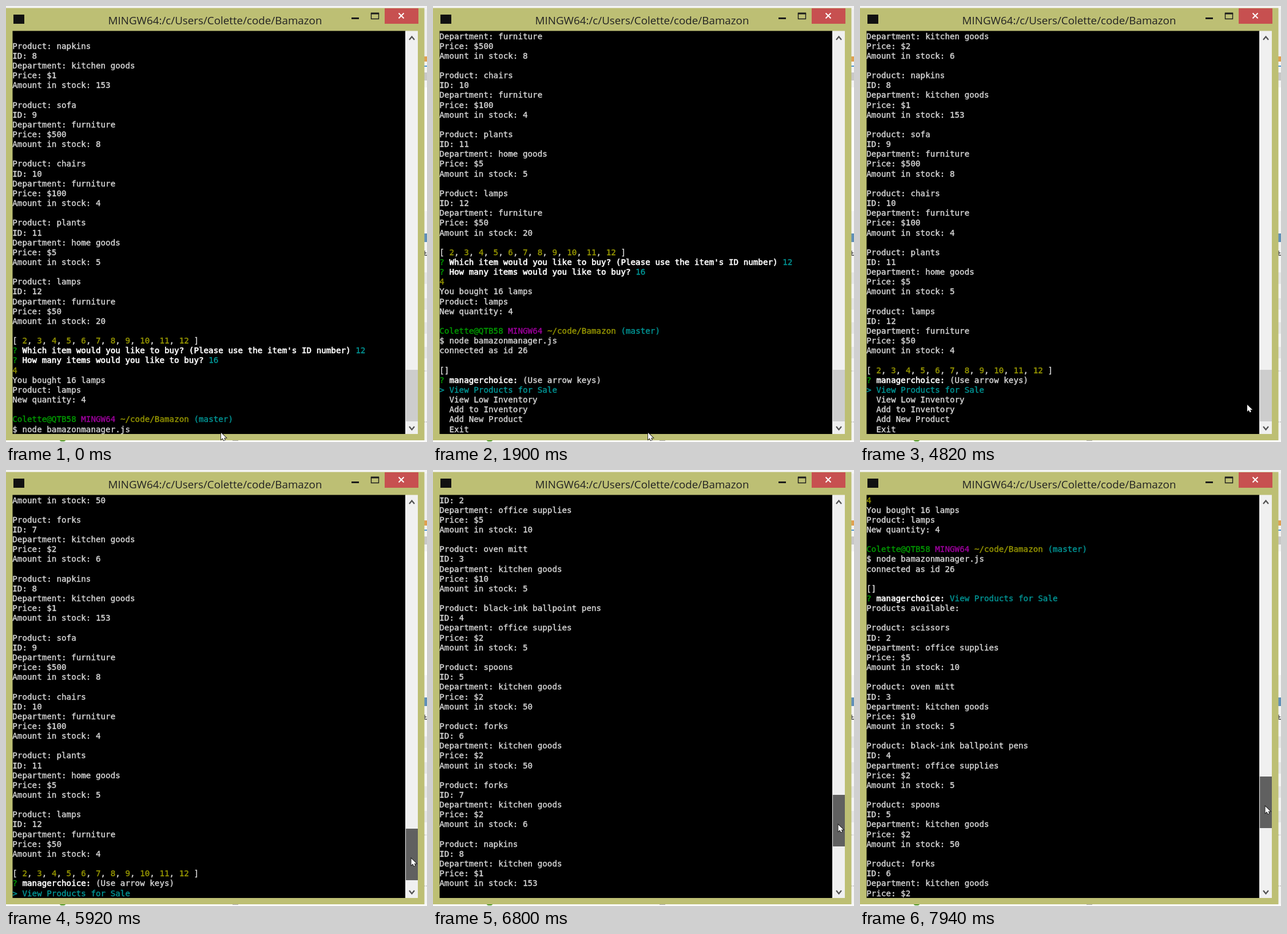
Recreate the animation shown at these times as an HTML page. Size 736 by 761 pixels, loop 8000 ms.

```html
<!DOCTYPE html>
<html lang="en">
<head>
<meta charset="utf-8">
<title>Terminal</title>
<style>
html, body { margin: 0; width: 100%; height: 100%; overflow: hidden; background: #f4f4f4; }
svg { display: block; width: 736px; height: 761px; }
#rows text { font: 14.24px "DejaVu Sans Mono", monospace; white-space: pre; }
#rows { color: #d6d6d6; }
#rows text, #rows tspan { fill: currentColor; stroke: currentColor; stroke-width: .4px; }
#rows .g { color: #009a00; }
#rows .m { color: #9a009a; }
#rows .y { color: #969600; }
#rows .c { color: #009696; }
#rows .w { color: #fff; stroke-width: .65px; }
#title { font: 18.8px "Open Sans", sans-serif; fill: #222; }
</style>
</head>
<body>
<svg viewBox="0 0 736 761">
  <rect width="736" height="761" fill="#f4f4f4"/>
  <g id="behind">
    <rect y="757" width="736" height="4" fill="#fafafa"/>
    <ellipse cx="99" cy="758" rx="5" ry="2" fill="#4f9a28"/>
    <rect x="396" y="757" width="10" height="2" fill="#aaa"/>
    <rect x="731" y="6" width="5" height="84" fill="#eee"/>
    <rect x="731" y="88" width="5" height="9" fill="#e0a050"/>
    <rect x="731" y="104" width="5" height="2" fill="#4a90d0"/>
    <rect x="731" y="116" width="5" height="14" fill="#c8c8c8"/>
    <rect x="731" y="142" width="5" height="216" fill="#fff"/>
    <rect x="731" y="397" width="5" height="15" fill="#5f8fb8"/>
    <path d="M731 431H735M732 427V435H736" fill="none" stroke="#444" stroke-width="1.3"/>
    <path d="M733.5 465V485M733.5 510V530M733.5 552V572M733.5 595V615" stroke="#e6e6e6" stroke-width="5"/>
    <path d="M731 637H735M731 726H736" stroke="#aaa" stroke-dasharray="2 1"/>
  </g>
  <rect y="3.5" width="731.5" height="754.5" fill="#bdbf74"/>
  <rect x="13" y="15" width="19" height="16" fill="#111"/>
  <text id="title" x="365.5" y="32" text-anchor="middle">MINGW64:/c/Users/Colette/code/Bamazon</text>
  <rect x="604" y="20" width="13" height="3" fill="#1c1c1c"/>
  <path d="M638.5 13V22.5H651.5V13" fill="none" stroke="#1c1c1c" stroke-width="1.4"/>
  <rect x="637.8" y="11.5" width="14.4" height="3" fill="#1c1c1c"/>
  <rect x="662" y="4" width="59" height="27" fill="#c75050"/>
  <path d="M686.5 12.5L695.5 21.5M695.5 12.5L686.5 21.5" stroke="#fff" stroke-width="2"/>
  <rect x="11.5" y="43.5" width="687" height="703.5" fill="#000"/>
  <rect x="698" y="43.5" width="22" height="703.5" fill="#f0f0f0"/>
  <path d="M705 59L709.5 53.5L714 59M705 734L709.5 739.5L714 734" fill="none" stroke="#505050" stroke-width="2.2"/>
  <rect id="thumb" x="699" width="21" height="90"/>
  <g id="rows"></g>
  <rect id="caret" y="744" width="8.6" height="2.8" fill="#bfbfbf"/>
  <path id="mouse" d="M0 0V11.8L2.8 9.3L4.6 13.2L6.8 12.2L5.1 8.7H9Z" fill="#fff" stroke="#111" stroke-width="1.6" paint-order="stroke"/>
</svg>
<script>
const LOOP = 8000, ROWS = 41, PITCH = 17.15, CHAR = 8.575;
const $ = id => document.getElementById(id);

// Segments are marked as {class|text}
const paint = s => s.replace(/>/g, '&gt;')
  .replace(/\{(\w)\|([^}]*)\}/g, '<tspan class="$1">$2</tspan>');

const goods = [
  ['scissors', 'office supplies', 5, 10],
  ['oven mitt', 'kitchen goods', 10, 5],
  ['black-ink ballpoint pens', 'office supplies', 2, 5],
  ['spoons', 'kitchen goods', 2, 50],
  ['forks', 'kitchen goods', 2, 50],
  ['forks', 'kitchen goods', 2, 6],
  ['napkins', 'kitchen goods', 1, 153],
  ['sofa', 'furniture', 500, 8],
  ['chairs', 'furniture', 100, 4],
  ['plants', 'home goods', 5, 5],
  ['lamps', 'furniture', 50, 4]
];
const list = (firstId, lamps) => goods.flatMap(([name, dept, price, stock], i) =>
  i + 2 < firstId ? [] : ['', 'Product: ' + name, 'ID: ' + (i + 2), 'Department: ' + dept,
    'Price: $' + price, 'Amount in stock: ' + (name === 'lamps' ? lamps : stock)]);

const ids = '[ ' + goods.map((_, i) => `{y|${i + 2}}`).join(', ') + ' ]';
const ask = '{g|?} {w|managerchoice:} ';
const menu = [ask + '(Use arrow keys)', '{c|> View Products for Sale}', '  View Low Inventory',
  '  Add to Inventory', '  Add New Product', '  Exit'];

const history = [...list(8, 20), '', ids,
  "{g|?} {w|Which item would you like to buy? (Please use the item's ID number)} {c|12}",
  '{g|?} {w|How many items would you like to buy?} {c|16}',
  '{y|4}', 'You bought 16 lamps', 'Product: lamps', 'New quantity: 4', '',
  '{g|Colette@QTB58} {m|MINGW64} {y|~/code/Bamazon} {c|(master)}',
  '$ node bamazonmanager.js'];
const started = [...history, 'connected as id 26', '', '[]'];
const screens = {
  prompt: history,
  menu: [...started, ...menu],
  erasing: [...started, ...menu.slice(0, 3)],
  listed: [...started, ask + '{c|View Products for Sale}', 'Products available:',
    ...list(2, 4), '', ids, ...menu]
};

// Each track holds its value until the next time
const screenAt = [[0, 'prompt'], [1900, 'menu'], [3150, 'erasing'], [3270, 'listed']];
const topAt = [[0, 0], [1150, 1], [1900, 9], [3270, 79], [5920, 75], [6040, 71], [6220, 63],
  [6390, 56], [6650, 53], [6800, 48], [6920, 43], [7100, 37], [7280, 30], [7650, 34]];
const caretAt = [[0, -1], [120, 23], [260, 24], [400, -1], [900, 24], [1150, -1]];
const mouseAt = [[0, 376, 745], [3640, 485, 707], [3810, 663, 696], [4820, 677, 696],
  [4940, -50, 0], [5190, 714, 690], [5310, 711, 688], [5430, 708.5, 687]];
const thumbColor = [[0, '#cdcdcd'], [5190, '#a6a6a6'], [5550, '#606060']];
const nudgeAt = [[0, 0], [7650, 1], [7820, 0], [7940, -1]];
const at = (track, t) => track.findLast(k => k[0] <= t);

const rows = Array.from({ length: ROWS }, (_, i) => {
  const el = document.createElementNS('http://www.w3.org/2000/svg', 'text');
  el.setAttribute('x', 11.3);
  el.setAttribute('y', (57.5 + i * PITCH).toFixed(2));
  return $('rows').appendChild(el);
});
let shown = '';

function draw(t) {
  const screen = at(screenAt, t)[1], top = at(topAt, t)[1];
  if (shown !== screen + top) {
    shown = screen + top;
    rows.forEach((el, i) => { el.innerHTML = paint(screens[screen][top + i] || ''); });
  }

  const caret = at(caretAt, t)[1];
  $('caret').setAttribute('x', 11.7 + caret * CHAR);
  $('caret').setAttribute('visibility', caret < 0 ? 'hidden' : 'visible');

  const dragging = t >= 5920;
  const thumbY = dragging ? Math.round(635 - 2.2 * (79 - top)) + at(nudgeAt, t)[1] : 635;
  $('thumb').setAttribute('y', thumbY);
  $('thumb').setAttribute('fill', at(thumbColor, t)[1]);

  let [, x, y] = at(mouseAt, t);
  if (dragging) y = thumbY + 52;
  $('mouse').setAttribute('transform', `translate(${x} ${y})`);
}

const start = performance.now();
function tick() {
  draw((performance.now() - start) % LOOP);
  requestAnimationFrame(tick);
}
draw(0);
requestAnimationFrame(tick);
</script>
</body>
</html>
```
